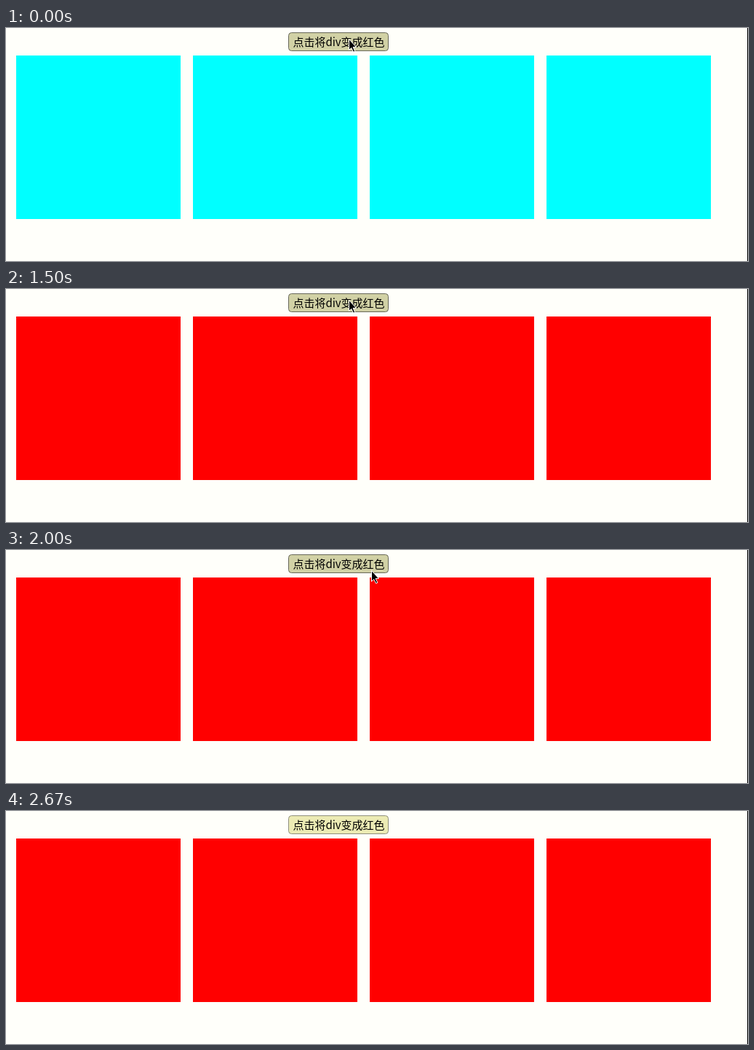
Animation of 1020 by 322 pixels, one loop 3080 ms. Source, as an HTML page:

```html
<!DOCTYPE html>
<html lang="zh-CN">
<head>
<meta charset="utf-8">
<style>
html, body { margin: 0; width: 100%; height: 100%; overflow: hidden; background: #fffffa; }
svg { display: block; }
text { font: 15px "Noto Sans CJK SC", "Noto Sans CJK", sans-serif; }
</style>
</head>
<body>
<svg width="1020" height="322" viewBox="0 0 1020 322">
  <rect width="1020" height="322" fill="#fffffa"/>
  <rect x="1019" width="1" height="322" fill="#000"/>
  <g id="boxes"></g>
  <rect id="button" x="388.5" y="6.5" width="137" height="25" rx="4"/>
  <text x="457.5" y="25" text-anchor="middle">点击将div变成红色</text>
  <path id="cursor" d="M.5.5V15.5L3.7 12.4 6.6 18.2 8.8 17.2 6.1 11.4H10.5Z" fill="#000" stroke="#fff" stroke-width="1"/>
</svg>
<script>
const LOOP = 3080, PRESS = 1330, RELEASE = 1460, LEAVE = 2000;
const MOVES = [LEAVE, 2040, 2080, 2130, 2170];
const STYLES = {
  normal: ['#ecebb4', '#8f8f7c'],
  hover: ['#d1d1a5', '#676758'],
  active: ['#b1b1a8', '#484844']
};
const get = id => document.getElementById(id);
const boxes = get('boxes'), button = get('button'), cursor = get('cursor');

for (let i = 0; i < 4; i++) {
  const box = document.createElementNS('http://www.w3.org/2000/svg', 'rect');
  const attrs = { x: 14 + 243 * i, y: 38, width: 226, height: 226 };
  for (const key in attrs) box.setAttribute(key, attrs[key]);
  boxes.append(box);
}

function buttonState(t) {
  if (t >= PRESS && t < RELEASE) return 'active';
  return t < MOVES[1] ? 'hover' : 'normal';
}

// The pointer rests, then speeds off to the lower right in discrete steps.
function cursorPosition(t) {
  if (t < LEAVE) return [471, 15];
  const step = MOVES.filter(m => m <= t).length - 1;
  const u = (step / 3) ** 1.3;
  return [Math.round(502 + 277 * u), Math.round(28 + 250 * u)];
}

function draw(t) {
  const [fill, stroke] = STYLES[buttonState(t)];
  button.setAttribute('fill', fill);
  button.setAttribute('stroke', stroke);
  boxes.setAttribute('fill', t < RELEASE ? '#0ff' : '#f00');
  cursor.setAttribute('visibility', t < MOVES[4] ? 'visible' : 'hidden');
  cursor.setAttribute('transform', `translate(${cursorPosition(t)})`);
}

const start = performance.now();
function tick() {
  draw((performance.now() - start) % LOOP);
  requestAnimationFrame(tick);
}
tick();
</script>
</body>
</html>
```
